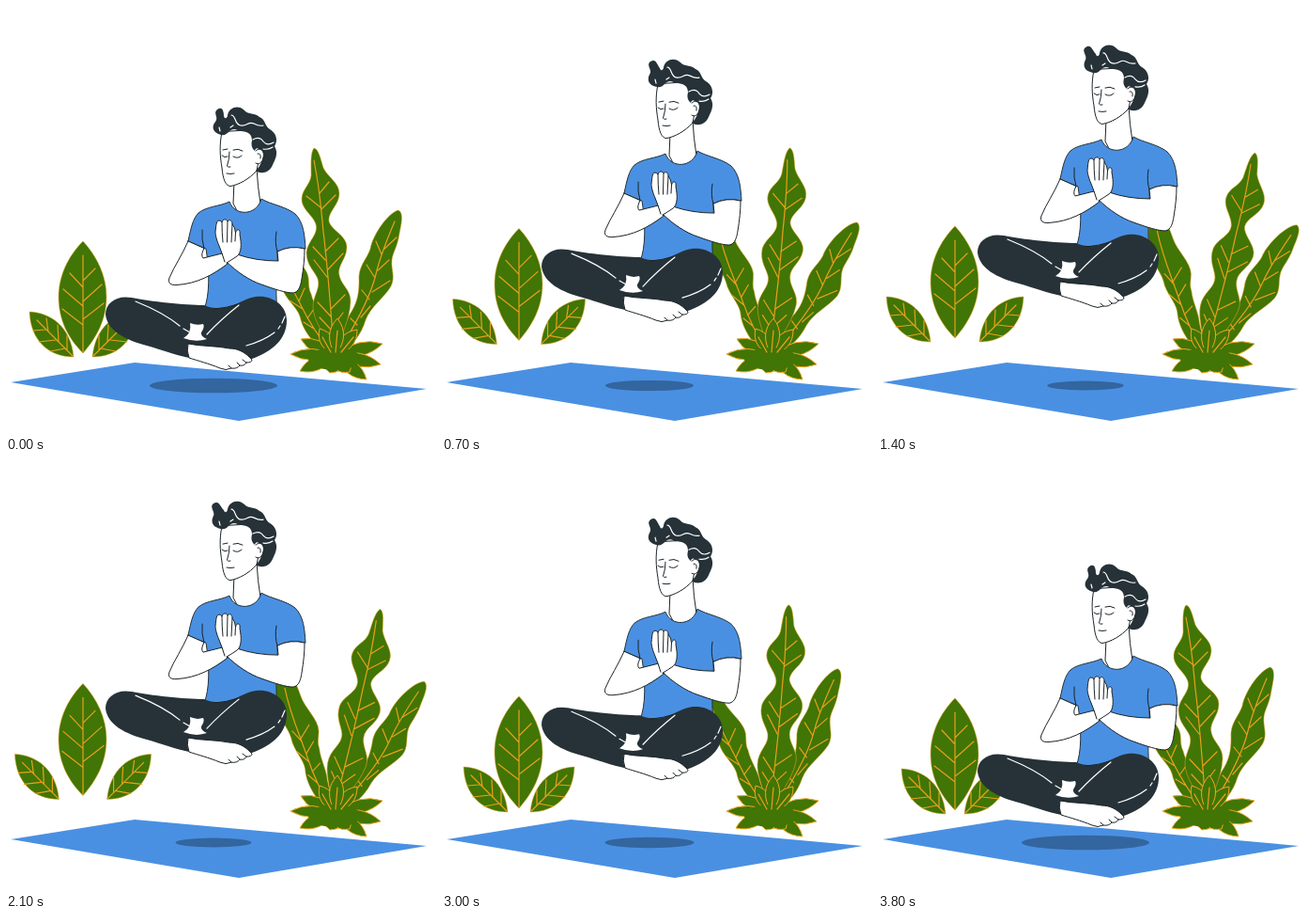
Write an HTML page that moves like this. It is 458 by 456 pixels and loops after 3.9 s.

```html
<!DOCTYPE html>
<html lang="en">
<head>
<meta charset="utf-8">
<title>Floating meditation</title>
<style>
html, body { margin: 0; width: 100%; height: 100%; overflow: hidden; background: #fff; }
svg { display: block; width: 100%; height: 100%; }
.leaf { fill: #417505; stroke: #f5a623; stroke-width: .7; stroke-opacity: .7; stroke-linejoin: round; }
#tuft .leaf { stroke-width: 1; stroke-opacity: 1; }
.vein { fill: none; stroke: #e9a01c; stroke-width: 1.2; stroke-linecap: round; }
.dark { fill: #263238; }
.skin { fill: #fff; stroke: #1b2327; stroke-width: 1; stroke-linejoin: round; stroke-linecap: round; }
.shirt { fill: #4a90e2; stroke: #263238; stroke-width: 1; stroke-linejoin: round; }
.ink { fill: none; stroke: #1b2327; stroke-width: 1; stroke-linecap: round; }
.shine { fill: none; stroke: #fff; stroke-width: 1.2; stroke-linecap: round; }
</style>
</head>
<body>
<svg viewBox="0 0 458 456" preserveAspectRatio="none">
  <defs>
    <g id="small">
      <path class="leaf" d="M25 325C48 326 69 341 72 373C45 373 26 355 25 325Z"/>
      <path class="vein" d="M33 334L71 372M43 332L45 346M55 339L56 357M65 350L65 366M29 345L42 344M35 357L53 355M47 367L63 364"/>
    </g>
  </defs>
  <polygon points="5,400 137,379 448,407 248,441" fill="#4a90e2"/>
  <ellipse id="shadow" cx="221" cy="403.5" fill="#33659f"/>

  <use id="leafL" href="#small"/>
  <g id="leafR"><use href="#small" transform="translate(164 0) scale(-1 1)"/></g>
  <g id="leafM">
    <path class="leaf" d="M82 250C97 266 107 287 107 309C107 334 96 353 82 369C66 353 56 334 56 309C56 287 66 266 82 250Z"/>
    <path class="vein" d="M82 265V368M95 279L82 292M102 296L82 314M104 316L82 333M68 284L82 299M61 301L82 319M60 322L82 339"/>
  </g>

  <g id="stemL">
    <path class="leaf" d="M276 232C288 234 293 244 298 254C304 266 320 276 322 288C323 296 322 300 325 306C328 318 336 328 338 338C342 350 347 358 350 368L338 368C324 354 316 344 313 330C310 320 298 312 294 300C290 290 278 282 274 266C270 250 268 236 276 232Z"/>
    <path class="vein" d="M280 248C290 276 302 294 314 318Q328 346 345 366M311 283L304 299M318 300L312 314M328 322L321 332M294 292L306 302M302 313L316 322M317 336L328 343"/>
  </g>
  <g id="stemR">
    <path class="leaf" d="M418 217C424 220 421 232 419 242C417 256 412 262 411 270C410 280 415 288 410 298C403 310 388 320 383 334C378 350 370 358 362 366L352 366C352 350 360 340 366 328C374 316 376 306 376 292C375 276 384 270 388 258C391 242 408 219 418 217Z"/>
    <path class="vein" d="M414 229C405 250 398 268 394 285C388 310 374 335 360 358M416 246L402 259M408 270L396 281M409 292L390 304M388 319L378 331M394 250L400 264M384 275L393 289M379 302L387 312M367 332L374 339"/>
  </g>
  <g id="stemT">
    <path class="leaf" d="M328 151C333 152 335 162 338 172C343 182 355 188 355 199C355 212 343 218 344 229C347 239 363 244 363 256C363 269 353 275 355 286C357 297 368 302 367 315C366 335 356 350 352 368L345 368C342 350 326 335 327 318C328 306 335 300 332 290C329 282 320 276 320 262C321 250 333 243 330 232C327 222 314 216 315 204C316 194 324 190 325 180C325 168 324 156 328 151Z"/>
    <path class="vein" d="M328 164C335 200 336 220 338 240C343 280 345 310 349 365M344 187L334 199M351 201L336 216M354 247L340 261M359 263L343 280M361 307L346 322M359 326L347 342M320 202L335 214M327 256L340 270M328 270L342 288M332 315L346 330M334 331L348 346"/>
  </g>
  <g id="tuft"></g>

  <g id="man">
    <path class="skin" d="M243 186L242 210Q256 240 271 210Q268 192 267 172Z"/>
    <path class="shirt" d="M238 208C244 224 267 223 272 205C282 211 298 213 308 221C317 230 318 243 319 258Q303 254 289 261C290 282 286 300 289 322L211 322C217 308 217 282 213 258Q203 254 194 250C197 236 199 226 205 220C213 213 228 213 238 208Z"/>
    <path class="ink" d="M289 261Q286 252 288 240M211 258Q208 248 209 238"/>
    <path class="skin" d="M194 250C188 264 179 277 174 289C172 295 176 297 182 296.500C204 295 220 286 236 274L230 263L210 268Q207 265 211 257.500Q203 254 194 250Z"/>
    <path class="skin" d="M289 261L290 271Q266 271 246 264L234 271C246 283 260 292 272 296C286 301 298 305 306 305C312 304 314 297 315 290C317 278 318 268 318 258Q303 254 289 261Z"/>
    <path class="skin" d="M233 272Q230 262 227 255C224 248 223 243 223 240C224 232 224 228 227 228Q229 228 230 230C231 226 235 226 236 229C238 226 241 228 241 232Q244 235 244.500 241C246 236 250 237 249 243C251 253 251 262 246 266Q240 270 235 273"/>
    <path class="ink" d="M230 230Q230 241 231 251M236 229L235.500 251M241 232L240 251M244.500 241L244 250"/>

    <path class="dark" d="M211 318C190 318 154 314 134 310C117 307 106 316 106 328C108 345 127 355 150 361C167 366 181 371 195 374L215 366L262 375C284 367 299 354 299 334C299 318 283 307 266 309C252 311 246 319 232 321Q220 322 211 318Z"/>
    <path class="ink" d="M222 322Q235 321 247 317"/>
    <path fill="#fff" d="M196 337Q203 340 210 338Q212 341 208 347Q207 351 214 354Q202 358 189 353Q198 348 196 337Z"/>
    <path class="skin" d="M194 359C208 362 224 361 238 364C246 364 254 367 262 376Q262 379 256 379Q254 383 249 382Q246 386 240 385Q234 388 228 385C216 380 204 377 195 374Q192 366 194 359Z"/>
    <path class="ink" d="M256 379L252 376M249 382L246 379M240 385L237 382"/>
    <path class="shine" d="M138 314Q168 326 185 340M189 343L196 347M248 318Q229 333 214 349M256 361Q274 356 286 347M290 343L292 340M294 337L297 330"/>

    <path class="skin" d="M230 134C227 148 228 160 230 172C231 184 234 191.500 239 191.500C248 190 259 184 267 175L272 150L262 132Z"/>
    <path id="hair" class="dark"/>
    <path class="skin" d="M266 154C271 149 276 155 274 161C273 167 269 169 266 167"/>
    <path class="ink" d="M268 157Q272 156 271 162M231 153L236 152M242 153Q247 151 252 154M230 159Q233 162 236 160M242 160Q247 163 251 159M238 155Q238 163 235.500 170Q236 172 239 171M235 178Q239 179 243 178"/>
    <path class="shine" d="M240 116C245 116 243 126 250 127C257 128 258 122 264 125Q270 128 274 127M263 142Q270 138 274 144Q278 149 285 145M227 129L228 133M239 129L242 127M274 152Q280 153 284 150"/>
  </g>
</svg>
<script>
const LOOP = 3900, STEP = 100;
const $ = id => document.getElementById(id);
const clamp = x => Math.min(1, Math.max(0, x));
const easeOut = x => 1 - (1 - x) ** 3;
const easeIn = x => x ** 3;
const easeBoth = x => x < .5 ? 2 * x * x : 1 - 2 * (1 - x) ** 2;

// Rises from 0 to 1, holds, then falls back.
const wave = (t, ease, up, from, down) =>
  ease(clamp(t / up)) - easeIn(clamp((t - from) / down));
const move = (id, x, y) => $(id).setAttribute("transform", `translate(${x} ${y})`);
const turn = (id, deg, x) => $(id).setAttribute("transform", `rotate(${deg} ${x} 368)`);

function blade(x, y, w) {
  const bx = 351, by = 371, dx = x - bx, dy = y - by, len = Math.hypot(dx, dy);
  const nx = -dy / len * w, ny = dx / len * w, mx = bx + dx * .55, my = by + dy * .55;
  return `<path class="leaf" d="M${bx} ${by}Q${mx + nx} ${my + ny} ${x} ${y}Q${mx - nx} ${my - ny} ${bx} ${by}Z"/>`;
}
$("tuft").innerHTML = [
  [314, 354, 13], [401, 359, 14], [303, 370, 12], [399, 381, 14], [313, 388, 14],
  [384, 397, 14], [345, 390, 22], [366, 389, 18], [334, 343, 14], [374, 344, 14], [353, 332, 15]
].map(b => blade(...b)).join("") +
  '<ellipse cx="350" cy="375" rx="28" ry="12" fill="#417505"/>' +
  '<path class="vein" d="M351 368L353 345M346 368L337 352M357 368L370 352"/>';

function hair(p) {
  const s = -4 * p;
  return `M229 137C${221 + s / 2} 135 218 129 ${223 + s / 2} 123C${227 + s} 118 ${220 + s} 114 ${225 + s} 110` +
    `C${231 + s} 106 ${232 + s} 113 232 117C233 121 236 119 236 116C238 107 248 105 254 111` +
    `C258 116 265 113 270 118C277 121 275 127 281 131C288 135 290 143 286 149` +
    `C291 157 286 164 284 169C280 178 271 179 266 175` +
    `Q274 168 273 155Q266 148 265 154Q260 150 262 143C262 135 256 133 248 133Q243 129 238 133Q234 138 229 137Z`;
}

function draw(t) {
  const lift = wave(t, easeOut, 1850, 1900, 1730);
  const spread = wave(t, easeOut, 1500, 1700, 1360);
  const sway = wave(t, easeBoth, 1300, 1360, 2150);
  const d = 16 * spread;
  move("man", 0, -67 * lift);
  $("hair").setAttribute("d", hair(lift));
  $("shadow").setAttribute("rx", 68 - 27.5 * lift);
  $("shadow").setAttribute("ry", 7.8 - 2.9 * lift);
  move("leafL", -d, -d);
  move("leafR", d, -d);
  move("leafM", 0, -d);
  turn("stemL", 8 * spread, 352);
  turn("stemR", 11.2 * spread, 352);
  turn("stemT", 19.4 * sway, 350);
}

const start = performance.now();
function tick() {
  const t = (performance.now() - start) % LOOP;
  draw(Math.floor(t / STEP) * STEP);
  requestAnimationFrame(tick);
}
tick();
</script>
</body>
</html>
```
